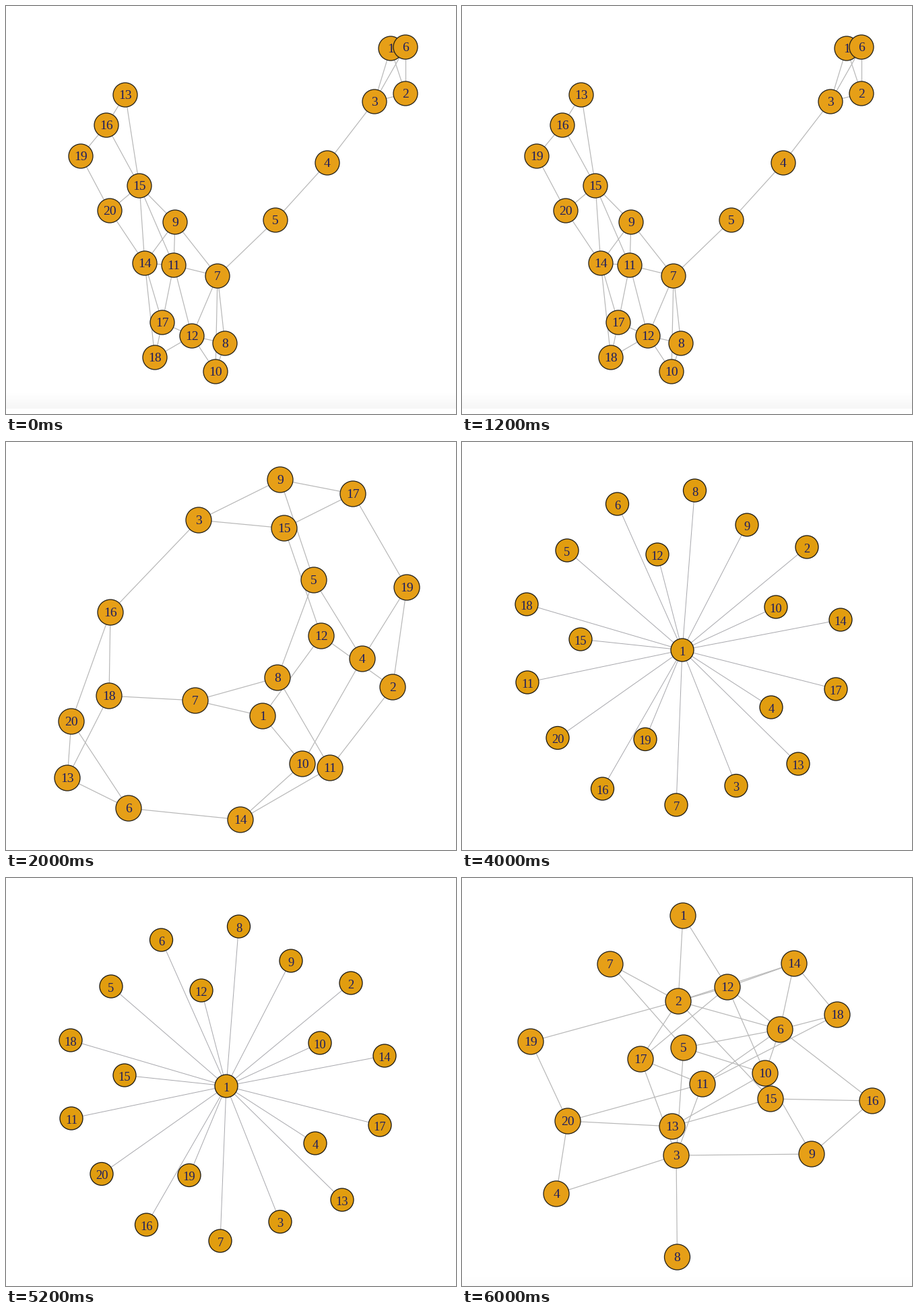
A matplotlib script that plays this animation: 668 px wide and 606 px high, repeating every 8000 ms.

```python
import matplotlib.pyplot as plt
import numpy as np
from matplotlib.animation import FuncAnimation
from matplotlib.collections import LineCollection
from matplotlib.patches import Circle

W, H, DPI = 668, 606, 100
PT = 72 / DPI  # points per pixel


class Graph:
    """Numbered nodes (1..n, in pixels) joined by an adjacency dict."""

    def __init__(self, nodes, links, radius=19, fill="#e69f17", edge="#b7b7b7",
                 edge_width=1.2, ring="#27231a", font=19.5, drop=0, shade=None):
        self.nodes = nodes
        self.links = links
        self.radius = radius
        self.fill = fill
        self.edge = edge
        self.edge_width = edge_width
        self.ring = ring
        self.font = font
        self.drop = drop
        self.shade = shade

    def draw(self, ax):
        if self.shade:
            top, bottom, grey = self.shade
            ramp = np.linspace(1, grey, bottom - top)[:, None]
            ax.imshow(ramp, cmap="gray", vmin=0, vmax=1, aspect="auto",
                      extent=(0, W, bottom, top), zorder=0)
        segments = [(self.nodes[a - 1], self.nodes[b - 1])
                    for a, ends in self.links.items() for b in ends]
        ax.add_collection(LineCollection(segments, colors=self.edge,
                                         linewidths=self.edge_width * PT, zorder=1))
        for number, (x, y) in enumerate(self.nodes, 1):
            ax.add_patch(Circle((x, y), self.radius, facecolor=self.fill,
                                edgecolor=self.ring, linewidth=1.3 * PT, zorder=2))
            ax.text(x, y + self.drop + self.font * 0.33, str(number),
                    family="Liberation Serif", size=self.font * PT,
                    color="#1c1c60", ha="center", va="baseline", zorder=3)


neighbourhood = Graph(
    [(571, 63), (593, 130), (547, 142), (477, 233), (400, 318),
     (593, 61), (314, 401), (325, 501), (251, 321), (311, 543),
     (249, 385), (276, 490), (177, 132), (206, 382), (198, 267),
     (149, 177), (232, 470), (221, 522), (111, 223), (154, 304)],
    {1: (2, 3, 6), 2: (3, 6), 3: (4, 6), 4: (5,), 5: (7,),
     7: (8, 9, 10, 11, 12), 8: (10, 12), 9: (11, 14, 15), 10: (12,),
     11: (12, 14, 15, 17), 12: (17, 18), 13: (15, 16),
     14: (15, 17, 18, 20), 15: (16, 20), 16: (19,), 17: (18,), 19: (20,)},
    radius=18, shade=(572, 598, 0.962))

regular = Graph(
    [(381, 407), (574, 364), (286, 116), (529, 322), (457, 205),
     (182, 544), (281, 384), (403, 350), (407, 56), (440, 478),
     (481, 484), (468, 288), (91, 499), (348, 561), (413, 128),
     (155, 253), (515, 77), (153, 377), (595, 216), (97, 415)],
    {1: (7, 10, 12), 2: (11, 12, 19), 3: (9, 15, 16), 4: (5, 10, 19),
     5: (8, 9), 6: (13, 14, 20), 7: (8, 18), 8: (11,), 9: (17,),
     10: (14,), 11: (14,), 12: (15,), 13: (18, 20), 15: (17,),
     16: (18, 20), 17: (19,)})

star = Graph(
    [(327, 309), (512, 156), (407, 510.5), (459, 394), (156, 161),
     (230.5, 92), (318, 539), (345.5, 72), (423, 123), (466, 245),
     (97, 357), (290, 167), (499, 478), (562, 264), (176, 293),
     (208.5, 515), (555, 367), (96, 241), (272, 441.5), (142, 439.5)],
    {1: range(2, 21)},
    radius=17, fill="#e19d0f", edge="#a9a9ae", edge_width=1,
    ring="#1d1a14", font=18.5, drop=1.5)

random_graph = Graph(
    [(328, 56), (321, 183), (318, 412), (140, 469), (329, 252),
     (472, 225), (220, 128), (319.5, 563), (519, 410), (450, 290),
     (357, 306), (394, 162), (312, 369), (493, 127), (458, 328),
     (609, 331), (265, 269), (557, 203), (102, 243), (157, 361)],
    {1: (2, 12), 2: (6, 7, 12, 14, 15, 17, 19), 3: (4, 5, 8, 9, 11, 17),
     4: (20,), 5: (6, 7, 10), 6: (10, 11, 12, 14, 16, 18),
     9: (10, 16), 10: (12, 13), 11: (17, 18, 20), 12: (14, 17),
     13: (15, 20), 14: (18,), 15: (16,), 19: (20,)},
    shade=(588, 606, 0.984))

GRAPHS = [neighbourhood, regular, star, random_graph]

fig = plt.figure(figsize=(W / DPI, H / DPI), dpi=DPI, facecolor="white")
ax = fig.add_axes([0, 0, 1, 1])


def update(index):
    ax.clear()
    GRAPHS[index].draw(ax)
    ax.set(xlim=(0, W), ylim=(H, 0))
    ax.axis("off")
    return []


anim = FuncAnimation(fig, update, frames=len(GRAPHS), interval=2000,
                     repeat=True, repeat_delay=0, init_func=lambda: [])
plt.show()
```
